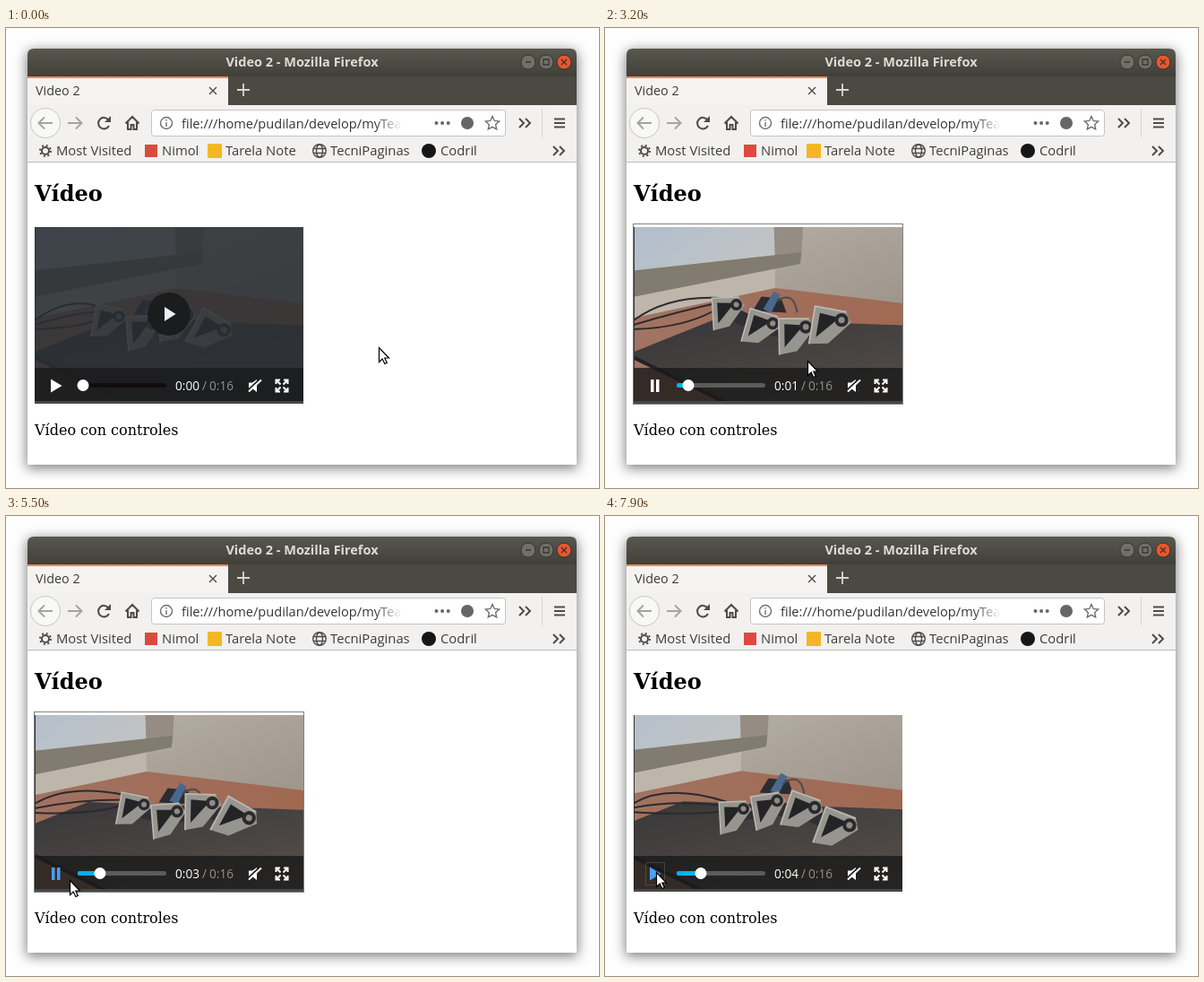
Recreate the animation shown at these times as an HTML page. Size 662x513 px, loop 8000 ms.

```html
<!DOCTYPE html>
<html lang="es">
<head>
<meta charset="utf-8">
<title>Video 2</title>
<style>
html, body { margin: 0; width: 100%; height: 100%; overflow: hidden; background: #fefefe; }
#win { position: absolute; left: 24px; top: 23px; width: 613px; height: 464px;
  border-radius: 7px 7px 0 0; box-shadow: 0 3px 14px 1px rgba(0,0,0,.5); }
svg { position: absolute; left: 0; top: 0; display: block; }
text { font-family: "Open Sans", "Noto Sans", sans-serif; font-size: 14.8px; fill: #3d3d3d; }
.serif { font-family: "DejaVu Serif", serif; font-size: 16px; fill: #000; }
.time { font-size: 13.6px; fill: #929292; }
.line { fill: none; stroke: #4c4c4c; stroke-width: 2; }
.thin { stroke-width: 1.4; }
.pale { stroke: #a4a4a2; }
.mid { stroke: #707070; }
</style>
</head>
<body>
<div id="win"></div>
<svg width="662" height="513" viewBox="0 0 662 513">
  <defs>
    <linearGradient id="bar" x2="0" y2="1"><stop stop-color="#59584f"/><stop offset="1" stop-color="#403f39"/></linearGradient>
    <linearGradient id="wall" x2=".6" y2="1"><stop stop-color="#bbb4aa"/><stop offset="1" stop-color="#958c83"/></linearGradient>
    <linearGradient id="glass" x2="1" y2=".5"><stop stop-color="#adbdd2"/><stop offset="1" stop-color="#c0c3c4"/></linearGradient>
    <linearGradient id="table" x2="1"><stop stop-color="#a17565"/><stop offset="1" stop-color="#a0674f"/></linearGradient>
    <linearGradient id="mat" x2=".7" y2="1"><stop stop-color="#363537"/><stop offset="1" stop-color="#57514b"/></linearGradient>
    <linearGradient id="fade" gradientUnits="userSpaceOnUse" x1="412" x2="442"><stop stop-color="#333"/><stop offset="1" stop-color="#333" stop-opacity="0"/></linearGradient>
    <clipPath id="screen"><path d="M32 222H332V416H32Z"/></clipPath>
    <clipPath id="address"><path d="M190 92H442V120H190Z"/></clipPath>
    <g id="bracket">
      <path d="M-18 19L-15-17 15-14 20-4 0 17Z" fill="#96958f"/>
      <path d="M-12 12L-10-11 9-8Z" fill="#242426"/>
      <circle cx="11" cy="-6" r="6.500" fill="#2a2a2c"/><circle cx="11" cy="-6" r="3" fill="#8d8c8b"/>
      <path d="M-18 19L-15-17 15-14" fill="none" stroke="#bbbab4" stroke-width="1.500"/>
    </g>
    <path id="more" class="line" d="M0 0L5 5 0 10M7 0L12 5 7 10"/>
    <path id="corner" d="M5.500 1H1V5.500M1.500 1.500L6 6" fill="none" stroke="#fff" stroke-width="2"/>
  </defs>

  <!-- window frame -->
  <path d="M24 54V30Q24 23 31 23H630Q637 23 637 30V54Z" fill="url(#bar)"/>
  <path d="M24 54H637V86H24Z" fill="#4a4942"/>
  <text x="330.500" y="43" text-anchor="middle" style="font-size:14.500px;font-weight:700;fill:#dfdbd2">Video 2 - Mozilla Firefox</text>
  <g stroke="#35342f" fill="#716f68">
    <circle cx="583" cy="38" r="8"/><circle cx="603" cy="38" r="8"/><circle cx="623" cy="38" r="8" fill="#e9562d"/>
  </g>
  <path d="M580 38H586M600 35H606V41H600ZM620 35L626 41M626 35L620 41" fill="none" stroke="#38362f" stroke-width="1.300"/>
  <path d="M24 54H248V86H24Z" fill="#f4f3f1"/>
  <path d="M24 54H248V56H24Z" fill="#e88a5e"/>
  <text x="33" y="75" style="font-size:14.400px">Video 2</text>
  <path class="line thin" d="M227 66L235 74M235 66L227 74"/>
  <path d="M258 69H272M265 62V76" stroke="#d8d6d0" stroke-width="1.800"/>
  <path d="M24 86H637V150H24Z" fill="#f2f1ef"/>
  <path d="M24 149.500H637" stroke="#bfbebb"/>
  <path d="M24 150H637V487H24Z" fill="#fff"/>

  <!-- toolbar -->
  <circle cx="44" cy="106" r="16.500" fill="#f8f8f7" stroke="#c6c5c2"/>
  <path class="line pale" d="M52 106H37M43 99.500L36.500 106 43 112.500M69 106H84M78 99.500L84.500 106 78 112.500"/>
  <path class="line" d="M114.500 102.500A6.300 6.300 0 1 0 115 109"/>
  <path d="M117 98V105H110Z" fill="#4c4c4c"/>
  <path class="line" d="M133.500 106.500L141 99 148.500 106.500M136 105V113H139.500V108H142.500V113H146V105"/>
  <rect x="162.500" y="91.500" width="395" height="29" rx="3" fill="#fff" stroke="#c5c4c1"/>
  <circle class="line thin mid" cx="179" cy="106" r="6.500"/>
  <path class="line thin mid" d="M179 105V110M179 102V103.500"/>
  <text x="196" y="112" style="font-size:14.600px;fill:url(#fade)" clip-path="url(#address)">file:///home/pudilan/develop/myTeaching</text>
  <path d="M480.500 106H494" stroke="#666" stroke-width="4" stroke-linecap="round" stroke-dasharray="0 6.600"/>
  <circle cx="515" cy="106" r="7" fill="#666"/>
  <path id="star" class="line thin mid"/>
  <use href="#more" x="573" y="101"/>
  <path d="M598.500 90V122" stroke="#d5d4d1"/>
  <path class="line" d="M612 101.500H624M612 106H624M612 110.500H624"/>

  <!-- bookmarks -->
  <circle class="line" cx="44" cy="137" r="4"/>
  <circle class="line" cx="44" cy="137" r="6" stroke-dasharray="2 2.712"/>
  <text x="56" y="142">Most Visited</text>
  <path d="M155 130H169V144H155Z" fill="#dc4a3f"/>
  <text x="174" y="142">Nimol</text>
  <path d="M225 129H241V145H225Z" fill="#f4b724"/>
  <text x="245" y="142">Tarela Note</text>
  <g class="line thin"><circle cx="350" cy="137" r="7.300"/><ellipse cx="350" cy="137" rx="3.500" ry="7.300"/><path d="M343 134.500H357M343 139.500H357"/></g>
  <text x="362" y="142">TecniPaginas</text>
  <circle cx="472" cy="137" r="8" fill="#161616"/>
  <text x="485" y="142">Codril</text>
  <use href="#more" x="611" y="132"/>

  <!-- page -->
  <text class="serif" x="32" y="193" style="font-size:24px;font-weight:700">Vídeo</text>
  <text class="serif" x="32" y="454">Vídeo con controles</text>

  <!-- film -->
  <g clip-path="url(#screen)">
    <path d="M32 222H332V416H32Z" fill="url(#wall)"/>
    <g id="room">
      <path d="M0 299L190 266V292L0 335Z" fill="#beb6aa"/>
      <path d="M0 205H188L190 257 0 275Z" fill="url(#glass)"/>
      <path d="M188 205H222L219 258 190 262Z" fill="#958d84"/>
      <path d="M0 274L219 250 218 263 0 306Z" fill="#817b70"/>
      <path d="M0 330L190 290 400 315V440H0Z" fill="url(#table)"/>
      <path d="M25 364L125 324 400 334V440H180Z" fill="url(#mat)"/>
      <path d="M25 364L180 440" stroke="#242326" stroke-width="4"/>
    </g>
    <path d="M32.500 222V416" stroke="#333"/>
    <path id="cables" class="line" style="stroke:#2b2a2d"/>
    <path id="spine" fill="none" stroke="#302f33" stroke-width="15"/>
    <g id="board">
      <path d="M-18 2L-8-14 14-12 20 4Z" fill="#2b2c32"/>
      <path d="M-6 0L6-20 13-16 3 4Z" fill="#496a8e"/>
      <path class="line" d="M8-8Q28-22 32 4"/>
    </g>
    <g id="robot"></g>
  </g>
  <g id="cover">
    <path d="M32 222H332V416H32Z" fill="rgba(42,46,51,.85)"/>
    <circle cx="182" cy="319" r="24" fill="#1b1c1d"/>
    <path d="M177 311L189.500 319 177 327Z" fill="#eee"/>
  </g>

  <!-- controls -->
  <g id="controls">
    <path d="M32 379H332V419H32Z" fill="rgba(26,26,26,.8)"/>
    <path id="button"/>
    <path id="ring" d="M45.500 386.500H66.500V411.500H45.500Z" fill="none" stroke="#666" stroke-dasharray="1 1"/>
    <rect id="track" x="80" y="396" width="99" height="5" rx="2.500"/>
    <rect id="done" x="80" y="396" height="5" rx="2" fill="#00b2f0"/>
    <circle id="knob" cy="398.500" r="6.500" fill="#fff"/>
    <text id="clock" class="time" x="189" y="404" style="fill:#fff"></text>
    <text class="time" x="219" y="404">/<tspan x="227">0:16</tspan></text>
    <path d="M271 395.500H275L280 392V406L275 402H271Z" fill="#fff"/>
    <path d="M270 404L284 391" stroke="#222" stroke-width="2"/>
    <path d="M271 405.500L285 392.500" stroke="#fff" stroke-width="2"/>
    <g id="expand" transform="translate(308 399)"></g>
  </g>
  <path id="focus" d="M31.500 218.500H332.500V419.500H31.500Z" fill="none" stroke="#000" stroke-dasharray="1 1"/>
  <path id="cursor" stroke="#000"/>
</svg>
<script>
const LOOP = 8000, STEP = 100, PLAY = 1900, PAUSE = 5900, TAU = 2 * Math.PI;
const ARROW = "M.5 .5V16.500L4.200 13 6.800 18.500 9.300 17.400 6.800 12H11.500Z";
const BEAM = "M-3 -8H-1L0 -7 1 -8H3M-3 8H-1L0 7 1 8H3M0 -7V7M-2 1H2";

// pointer stops: time, x, y
const stops = [
  [400, 416, 356], [700, 312, 414], [1000, 142, 299], [1100, 185, 338], [1400, 240, 385],
  [1700, 181, 318], [2700, 181, 318], [3200, 226, 371], [4100, 76, 433], [4500, 70, 413],
  [5500, 71, 406], [6000, 58, 397], [6400, 170, 462], [6900, 170, 462], [7000, 180, 450],
  [7700, 122, 402], [7900, 57, 397]];

const el = id => document.getElementById(id);
const set = (id, attrs) => { for (const k in attrs) el(id).setAttribute(k, attrs[k]); };
const show = (id, opacity) => set(id, { opacity: +opacity });
const move = (id, x, y) => set(id, { transform: `translate(${x} ${y})` });
const clamp = (v, lo = 0, hi = 1) => Math.min(Math.max(v, lo), hi);
const smooth = f => f * f * (3 - 2 * f);
const range = n => [...Array(n).keys()];

function pointerAt(t) {
  const i = stops.findIndex(s => s[0] > t);
  if (i <= 0) return stops.at(i).slice(1);
  const [t0, x0, y0] = stops[i - 1], [t1, x1, y1] = stops[i];
  const f = (t - t0) / (t1 - t0);
  return [x0 + (x1 - x0) * f, y0 + (y1 - y0) * f];
}

// The robot walks right as a travelling wave while the camera pans after it.
function drawFilm(t) {
  const now = clamp(t, PLAY, PAUSE);
  const pan = -38 * smooth(clamp((now - 4100) / 1800)), tilt = pan * .15;
  const joints = range(4).map(i => {
    const phase = TAU * (i / 3.2 + (now - 4100) / 1800);
    return {
      x: 123 + .017 * (now - 2400) + pan + 38 * i,
      y: 325 + 5 * i + 9 * Math.cos(phase),
      turn: 6 * i - 8 - 14 * Math.sin(phase) };
  });
  const [first, second] = joints;
  move("room", pan, tilt);
  move("board", second.x + 8, second.y - 20);
  set("spine", { d: "M" + joints.map(j => `${j.x} ${j.y}`).join("L") });
  joints.forEach((j, i) => robot[i].setAttribute("transform",
    `translate(${j.x} ${j.y}) rotate(${j.turn}) scale(${1 + i * .06})`));
  set("cables", { d: range(3).map(i =>
    `M32 ${326 + 5 * i + tilt}Q${70 + 12 * i} ${298 + 18 * i} ${first.x - 8} ${first.y - 15 + 5 * i}`).join("") });
}

function drawControls(t, x, y) {
  const sec = (clamp(t, 1850, PAUSE) - 1850) * .00095, knob = 86 + sec * 5.45;
  const playing = t >= PLAY && t < PAUSE;
  const hover = x > 36 && x < 78 && y > 379 && y < 419;
  const hidden = (from, to) => clamp((t - from) / 200) * clamp((to - t) / 200);
  set("button", {
    d: playing ? "M51 392H54.500V406H51ZM57 392H60.500V406H57Z" : "M50 391.500L62.500 399 50 406.500Z",
    fill: hover || t >= PAUSE ? "#48a0f7" : "#fff" });
  set("track", { fill: t < PLAY ? "#100d0e" : "#5b5b5b" });
  set("done", { width: t < PLAY ? 0 : knob - 80 });
  set("knob", { cx: knob });
  el("clock").textContent = "0:0" + Math.round(sec);
  show("controls", 1 - hidden(3800, 4500) - hidden(6200, 7500));
  show("ring", t >= PAUSE);
  show("focus", playing);
  show("cover", t < PLAY);
}

function frame(now) {
  const t = Math.floor(now % LOOP / STEP) * STEP;
  const [x, y] = pointerAt(t);
  const overText = x > 32 && x < 192 && y > 439 && y < 460;
  drawFilm(t);
  drawControls(t, x, y);
  set("cursor", overText ? { d: BEAM, fill: "none", "stroke-width": 1.8 } : { d: ARROW, fill: "#fff", "stroke-width": 1.2 });
  move("cursor", x, y);
  requestAnimationFrame(frame);
}

el("robot").innerHTML = '<use href="#bracket"/>'.repeat(4);
const robot = el("robot").children;
el("expand").innerHTML = range(4).map(i => `<use href="#corner" transform="rotate(${90 * i}) translate(-7.500 -7.500)"/>`).join("");
set("star", { d: "M" + range(10).map(i => {
  const r = i % 2 ? 3.8 : 8, a = TAU * i / 10;
  return `${543 + r * Math.sin(a)} ${106.5 - r * Math.cos(a)}`;
}).join("L") + "Z" });
requestAnimationFrame(frame);
</script>
</body>
</html>
```
